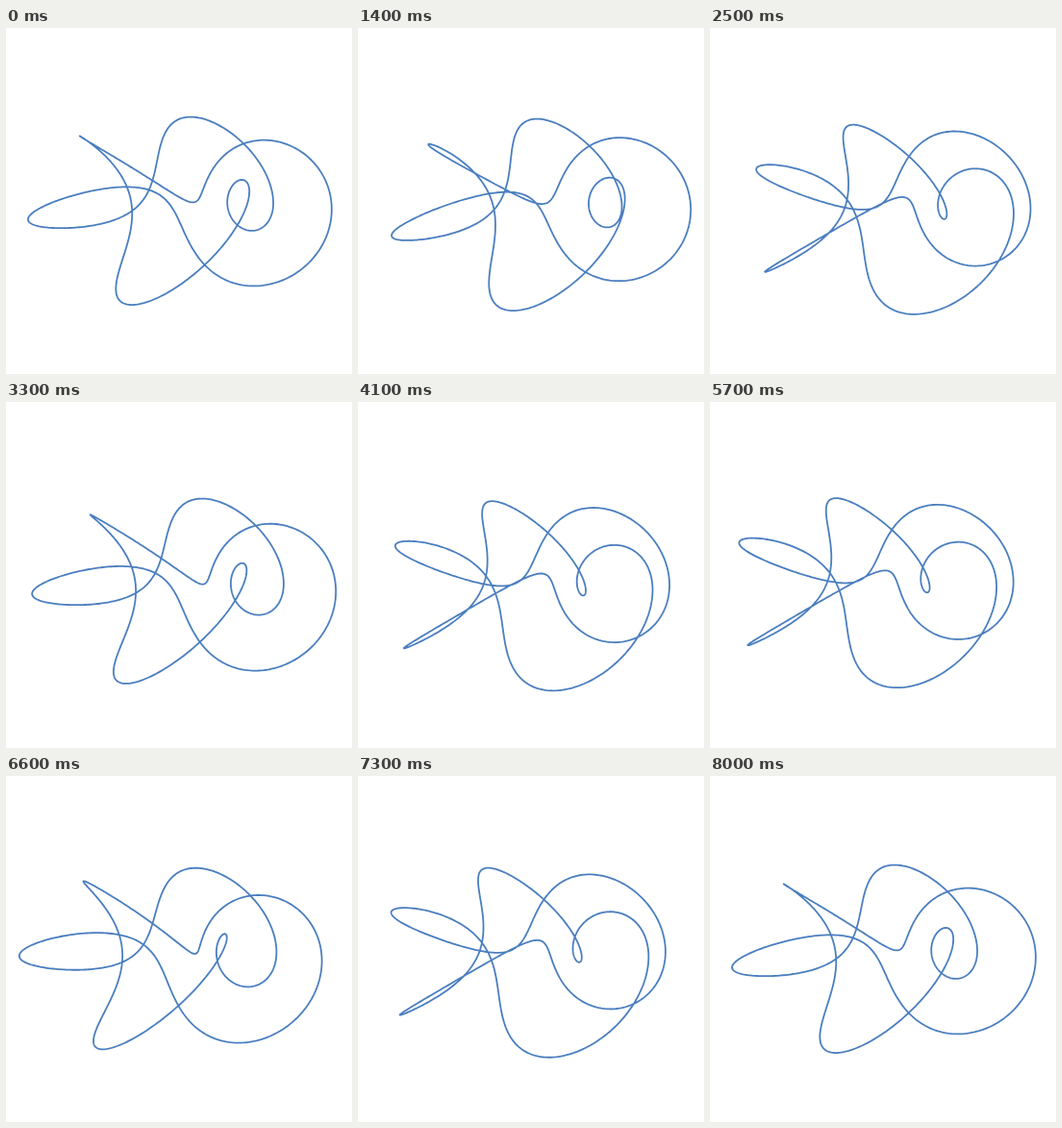
An HTML page with a canvas for the animation above (8.1 s loop, 360x360 px).

```html
<!DOCTYPE html>
<html>
<head>
<meta charset="utf-8">
<title>Rotating torus knot</title>
<style>
  html, body { margin: 0; width: 100%; height: 100%; overflow: hidden; background: #fff; }
  canvas { display: block; width: 100vmin; height: 100vmin; }
</style>
</head>
<body>
<canvas></canvas>
<script>
const SIZE = 360, STEP_MS = 100, STEPS = 81, TURN_STEPS = 80;
const RAD = Math.PI / 180;
const CENTER = { x: 180.5, y: 180.6 };
const DRIFT = { x: 9.4, y: 4.1 };     // the centre circles once per turn
const TUBE = 51.1, RING = 2 * TUBE;   // torus radii
const WINDS = 5, LAPS = 2;            // (2,5) torus knot
const EYE = 567;                      // camera distance
const START = 18 * RAD;
const SIN = Math.sin(26.8 * RAD), COS = Math.cos(26.8 * RAD);
const SAMPLES = 900;

const canvas = document.querySelector('canvas');
const ctx = canvas.getContext('2d');
const ratio = window.devicePixelRatio || 1;
canvas.width = canvas.height = SIZE * ratio;

function project(x, z, h) {
  const near = z * COS + h * SIN;
  const zoom = EYE / (EYE - near);
  return [zoom * x, zoom * (z * SIN - h * COS)];
}

function knotPoint(q, turn) {
  const p = START + turn - q * LAPS / WINDS;
  const rho = RING + TUBE * Math.cos(q);
  return project(rho * Math.cos(p), rho * Math.sin(p), TUBE * Math.sin(q));
}

function draw(turn) {
  ctx.setTransform(ratio, 0, 0, ratio, 0, 0);
  ctx.fillStyle = '#fff';
  ctx.fillRect(0, 0, SIZE, SIZE);
  ctx.translate(
    CENTER.x + DRIFT.x * Math.sin(turn),
    CENTER.y - DRIFT.y * Math.cos(turn)
  );
  ctx.beginPath();
  for (let i = 0; i < SAMPLES; i++) {
    ctx.lineTo(...knotPoint(i / SAMPLES * WINDS * 2 * Math.PI, turn));
  }
  ctx.closePath();
  ctx.strokeStyle = '#4a7ebf';
  ctx.lineWidth = 1.8;
  ctx.lineJoin = 'round';
  ctx.stroke();
}

const begin = performance.now();
function tick() {
  const step = Math.floor((performance.now() - begin) / STEP_MS) % STEPS;
  draw(step / TURN_STEPS * 2 * Math.PI);
  requestAnimationFrame(tick);
}
tick();
</script>
</body>
</html>
```
